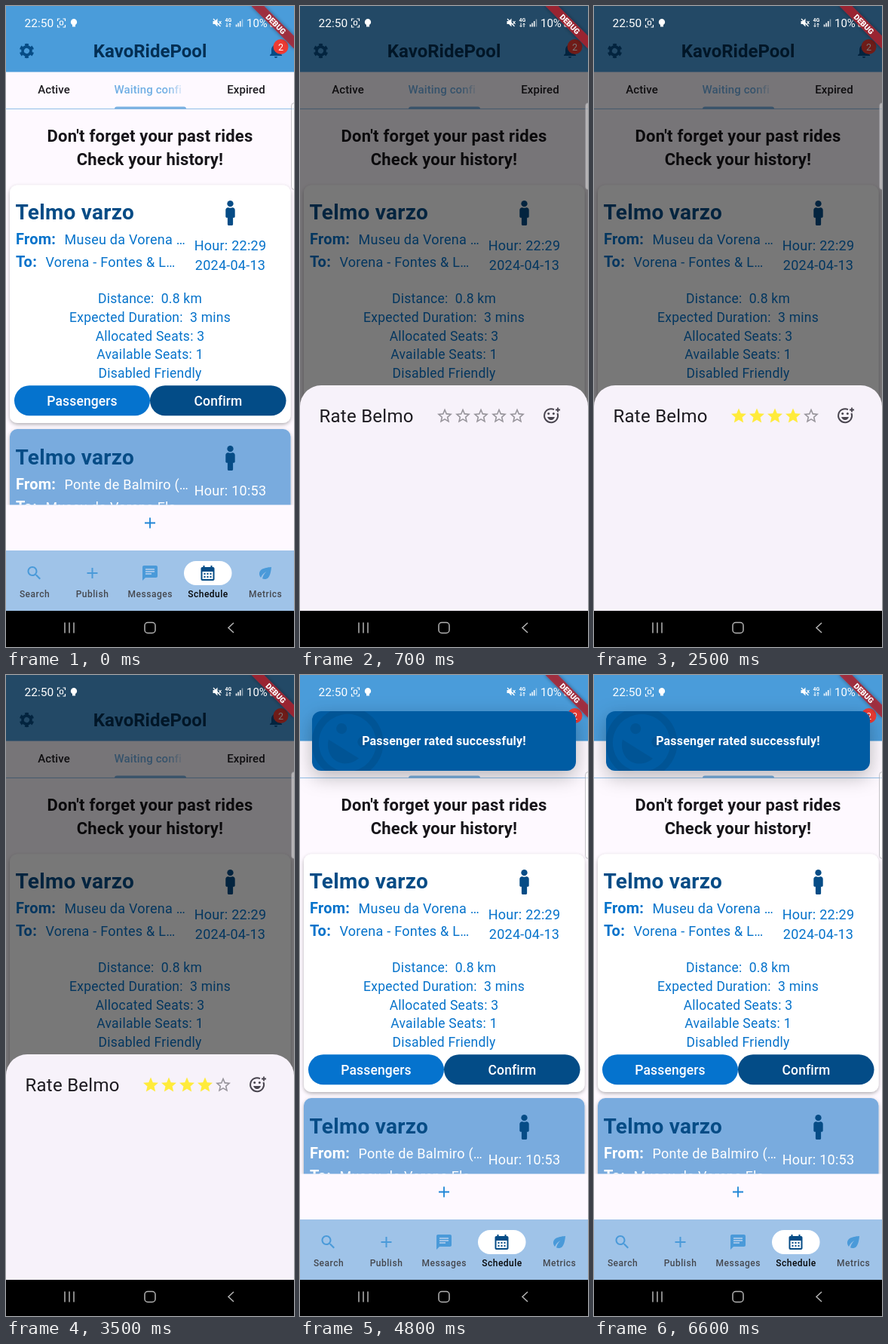
These frames come from a looping animation (382 px wide and 850 px high, 6.7 s). An HTML page:

```html
<!DOCTYPE html>
<html lang="en">
<head>
<meta charset="utf-8">
<title>Ride rating</title>
<style>
  html, body { margin: 0; width: 100%; height: 100%; overflow: hidden; background: #000; }
  svg { display: block; width: 382px; height: 850px; }
  text { font-family: Roboto, "Noto Sans", sans-serif; white-space: pre; }
  .mid { text-anchor: middle; }
  .bold { font-weight: 700; }
  .tab { font-size: 15px; font-weight: 500; letter-spacing: .1px; }
  .headline { font-size: 22px; font-weight: 700; letter-spacing: .2px; fill: #17151a; }
  .driver { font-size: 28px; font-weight: 700; letter-spacing: .25px; fill: #064c86; }
  .label { font-size: 20px; font-weight: 700; letter-spacing: .25px; }
  .value { font-size: 18px; letter-spacing: .25px; }
  .detail { font-size: 17.5px; letter-spacing: .25px; text-anchor: middle; }
  .button { font-size: 17.5px; font-weight: 500; letter-spacing: .1px; fill: #fff; text-anchor: middle; }
  .nav { font-size: 12px; font-weight: 500; letter-spacing: .5px; fill: #45484f; text-anchor: middle; }
</style>
</head>
<body>
<svg viewBox="0 0 382 850">
  <defs>
    <linearGradient id="tabFade" gradientUnits="userSpaceOnUse" x1="212" x2="239" y1="0" y2="0">
      <stop stop-color="#71afe4"/><stop offset="1" stop-color="#71afe4" stop-opacity="0"/>
    </linearGradient>
    <filter id="cardShadow" x="-10%" y="-10%" width="120%" height="120%">
      <feDropShadow dx="0" dy="2" stdDeviation="2.5" flood-opacity=".3"/>
    </filter>
    <filter id="toastShadow" x="-20%" y="-60%" width="140%" height="240%">
      <feDropShadow dx="0" dy="8" stdDeviation="13" flood-opacity=".28"/>
    </filter>
    <filter id="ribbonShadow" x="-20%" y="-80%" width="140%" height="260%">
      <feDropShadow dx="0" dy="0" stdDeviation="2.5" flood-opacity=".5"/>
    </filter>
    <clipPath id="listClip"><rect y="137" width="382" height="524.5"/></clipPath>
    <clipPath id="screenClip"><rect width="382" height="802"/></clipPath>
    <clipPath id="toastClip"><rect x="16" y="48" width="350" height="79" rx="12"/></clipPath>
    <g id="person">
      <circle cx="96" cy="64" r="64"/>
      <path d="M144 144h-11.4c-22.7 10.4-49.6 10.9-73.2 0H48c-26.5 0-48 21.5-48 48v136c0 13.3 10.7 24 24 24h16v136c0 13.3 10.7 24 24 24h64c13.3 0 24-10.7 24-24V352h16c13.3 0 24-10.7 24-24V192c0-26.5-21.5-48-48-48z"/>
    </g>
    <path id="starEmpty" d="M22 9.24l-7.19-.62L12 2 9.19 8.63 2 9.24l5.46 4.73L5.82 21 12 17.27 18.18 21l-1.63-7.03L22 9.24zM12 15.4l-3.76 2.27 1-4.28-3.32-2.88 4.38-.38L12 6.1l1.71 4.04 4.38.38-3.32 2.88 1 4.28L12 15.4z"/>
    <path id="starFull" d="M12 17.27L18.18 21l-1.64-7.03L22 9.24l-7.19-.61L12 2 9.19 8.63 2 9.24l5.46 4.73L5.82 21z"/>
  </defs>

  <g clip-path="url(#screenClip)">
    <rect width="382" height="802" fill="#fef9ff"/>

    <!-- app bar -->
    <rect width="382" height="87.5" fill="#4a9cda"/>
    <g fill="none" stroke="#064c86" transform="translate(27.5 59.5) rotate(30)">
      <circle r="5.5" stroke-width="3.8"/>
      <circle r="8.2" stroke-width="3" pathLength="60" stroke-dasharray="5.4 4.6" stroke-dashoffset="2.7"/>
    </g>
    <text class="mid bold" x="191" y="68" font-size="24" fill="#032f54">KavoRidePool</text>
    <path transform="translate(346 47)" fill="#064c86" d="M12 22c1.1 0 2-.9 2-2h-4c0 1.1.89 2 2 2zm6-6v-5c0-3.07-1.64-5.64-4.5-6.32V4c0-.83-.67-1.5-1.5-1.5s-1.5.67-1.5 1.5v.68C7.63 5.36 6 7.92 6 11v5l-2 2v1h16v-1l-2-2z"/>
    <circle cx="364.5" cy="54" r="10" fill="#ec3b34"/>
    <text class="mid" x="364.5" y="58.5" font-size="12.5" fill="#fff">2</text>

    <!-- tabs -->
    <g class="tab" fill="#1d1b20">
      <text class="mid" x="63.5" y="116">Active</text>
      <text x="143.5" y="116" fill="url(#tabFade)">Waiting confi</text>
      <text class="mid" x="318.5" y="116">Expired</text>
    </g>
    <path d="M0 136.4H382" stroke="#8dbce6"/>
    <path d="M144 136.5a3 3 0 0 1 3-3h89a3 3 0 0 1 3 3z" fill="#79b0e2"/>

    <text class="headline mid" x="191" y="180">Don't forget your past rides</text>
    <text class="headline mid" x="191" y="211">Check your history!</text>

    <!-- ride list -->
    <g clip-path="url(#listClip)">
      <rect x="5" y="237.5" width="372.5" height="315.5" rx="10" fill="#fff" filter="url(#cardShadow)"/>
      <rect x="5" y="561" width="372.5" height="200" rx="10" fill="#79abde" filter="url(#cardShadow)"/>
      <g id="rides"></g>
      <g fill="#0673cb" id="details"></g>
      <rect x="11" y="503.3" width="180" height="40" rx="20" fill="#0573ce"/>
      <rect x="191" y="503.3" width="180.5" height="40" rx="20" fill="#034c87"/>
      <text class="button" x="101" y="529.5">Passengers</text>
      <text class="button" x="281.5" y="529.5">Confirm</text>
    </g>
    <path d="M184 685.5h14m-7-7v14" stroke="#1f86d6" stroke-width="1.8"/>

    <!-- bottom navigation -->
    <rect y="722" width="382" height="80" fill="#9fc3e8"/>
    <rect x="236" y="736" width="63.5" height="32" rx="16" fill="#fff"/>
    <g fill="#4a9ad9">
      <path transform="translate(25.5 740)" d="M15.5 14h-.79l-.28-.27C15.41 12.59 16 11.11 16 9.5 16 5.91 13.09 3 9.5 3S3 5.91 3 9.5 5.91 16 9.5 16c1.61 0 3.09-.59 4.23-1.57l.27.28v.79l5 4.99L20.49 19l-4.99-5zm-6 0C7.01 14 5 11.99 5 9.5S7.01 5 9.5 5 14 7.01 14 9.5 11.99 14 9.5 14z"/>
      <path transform="translate(102.5 740)" d="M19 13h-6v6h-2v-6H5v-2h6V5h2v6h6v2z"/>
      <path transform="translate(179 740)" d="M20 2H4c-1.1 0-1.99.9-1.99 2L2 22l4-4h14c1.1 0 2-.9 2-2V4c0-1.1-.9-2-2-2zM6 9h12v2H6V9zm8 5H6v-2h8v2zm4-6H6V6h12v2z"/>
      <path transform="translate(255.5 740)" fill="#064c86" d="M19 4h-1V2h-2v2H8V2H6v2H5c-1.11 0-1.99.9-1.99 2L3 20c0 1.1.89 2 2 2h14c1.1 0 2-.9 2-2V6c0-1.1-.9-2-2-2zm0 16H5V10h14v10zM9 14H7v-2h2v2zm4 0h-2v-2h2v2zm4 0h-2v-2h2v2zm-8 4H7v-2h2v2zm4 0h-2v-2h2v2zm4 0h-2v-2h2v2z"/>
      <path transform="translate(332 740)" d="M6.05 8.05c-2.73 2.73-2.73 7.15-.02 9.88 1.47-3.4 4.09-6.24 7.36-7.93-2.77 2.34-4.71 5.61-5.39 9.32 2.6 1.23 5.8.78 7.95-1.37C19.43 14.47 20 4 20 4S9.53 4.57 6.05 8.05z"/>
    </g>
    <g class="nav">
      <text x="38" y="784">Search</text>
      <text x="114.5" y="784">Publish</text>
      <text x="191.2" y="784">Messages</text>
      <text x="268" y="784" fill="#050608">Schedule</text>
      <text x="344.2" y="784">Metrics</text>
    </g>

    <rect id="scrim" width="382" height="802"/>

    <!-- rating sheet, laid out from its own top edge -->
    <g id="sheet">
      <path d="M0 300V28A28 28 0 0 1 28 0H354A28 28 0 0 1 382 28V300z" fill="#f7f2fa"/>
      <text x="25.5" y="49" font-size="24" letter-spacing=".25" fill="#1d1b20">Rate Belmo</text>
      <g id="stars"></g>
      <g transform="translate(321 28)" fill="none" stroke="#49454f" stroke-width="2">
        <path d="M16 4.1A9 9 0 1 0 20.5 9"/>
        <path d="M18 4.5h6M21 1.5v6" stroke-width="1.8"/>
        <g fill="#49454f" stroke="none">
          <circle cx="8.7" cy="9.6" r="1.5"/><circle cx="15.3" cy="9.6" r="1.5"/>
          <path d="M7 14h10c-.78 2.34-2.72 4-5 4s-4.22-1.66-5-4z"/>
        </g>
      </g>
    </g>

    <g id="toast">
      <rect x="16" y="48" width="350" height="79" rx="12" fill="#005ca3" filter="url(#toastShadow)"/>
      <g clip-path="url(#toastClip)">
        <g transform="translate(63 90) rotate(32) scale(4.75) translate(-12 -12)" fill-opacity=".085" stroke-opacity=".085">
          <circle cx="12" cy="12" r="9" fill="none" stroke="#000" stroke-width="2"/>
          <circle cx="8.5" cy="9.5" r="1.5"/><circle cx="15.5" cy="9.5" r="1.5"/>
          <path d="M12 18c2.28 0 4.22-1.66 5-4H7c.78 2.34 2.72 4 5 4z"/>
        </g>
      </g>
      <text class="mid" x="191" y="93" font-size="16" font-weight="600" letter-spacing=".2" fill="#fff">Passenger rated successfuly!</text>
    </g>

    <!-- status bar -->
    <g fill="#fff">
      <text x="24.5" y="27.5" font-size="15.5">22:50</text>
      <g fill="none" stroke="#fff" stroke-width="1.2">
        <path d="M68.5 20v-3h3m4 0h3v3m0 5v3h-3m-4 0h-3v-3"/>
        <rect x="71.5" y="20" width="4" height="5" rx="1"/>
      </g>
      <path d="M90 17a4.3 4.3 0 0 1 2 8v2.5h-4V25a4.3 4.3 0 0 1 2-8z"/>
      <path d="M274.5 20h2.5l3.5-3.5v11L277 24h-2.5z"/>
      <path d="M275 17l9.5 10M282.5 20l3 4m0-4l-3 4" stroke="#fff" stroke-width="1.2"/>
      <text class="mid bold" x="295" y="21" font-size="7">4G</text>
      <path d="M293 22.5v5m-1.5-1.5l1.5 1.5 1.5-1.5M297 28v-5m-1.5 1.5l1.5-1.5 1.5 1.5" fill="none" stroke="#fff"/>
      <path d="M305.5 27.5v-3m2.6 3v-5m2.6 5v-7.5" stroke="#fff" stroke-width="1.5"/>
      <path d="M313.5 27.5v-10" stroke="#fff" stroke-width="1.5" opacity=".45"/>
      <text x="319" y="27.5" font-size="15">10%</text>
      <rect x="350" y="17" width="8" height="11" rx="2" opacity=".8"/>
    </g>

    <!-- corner ribbon and edge handle -->
    <g transform="translate(382 0) rotate(45)">
      <rect x="-40" y="28" width="80" height="12" fill="#b2202a" fill-opacity=".8" filter="url(#ribbonShadow)"/>
      <text class="mid" x="0" y="37.7" font-size="10.2" font-weight="900" fill="#fff">DEBUG</text>
    </g>
    <rect x="378.5" y="128.5" width="12" height="115" rx="4" fill="#fff" fill-opacity=".45" stroke="#8a8a90" stroke-opacity=".5"/>
  </g>

  <!-- system navigation -->
  <rect y="802" width="382" height="48"/>
  <g fill="none" stroke="#b4b4b4" stroke-width="1.5">
    <path d="M78 817.5v14m6-14v14m6-14v14M302 818l-7 6.5 7 6.5"/>
    <rect x="184" y="817.5" width="14" height="14" rx="4"/>
  </g>
</svg>

<script>
const LOOP = 6700;
const SHEET_HEIGHT = 299;
const SHEET_OPEN = 324, SHEET_CLOSE = 4350, RATED = 2500;
const TOAST_IN = 4252, TOAST_TIME = 1100, TOAST_TRAVEL = 128;
const byId = id => document.getElementById(id);
const clamp = v => Math.min(1, Math.max(0, v));

function ride(dy, color, from, to, hour, date) {
  const line = (y, label, x, value) =>
    `<text class="label" x="13" y="${y}">${label}</text><text class="value" x="${x}" y="${y}">${value}</text>`;
  return `<g transform="translate(0 ${dy})" fill="${color}">
    <text class="driver" x="12.5" y="282.5">Telmo varzo</text>
    <use href="#person" transform="translate(291.3 258) scale(.0645)" fill="#064c86"/>
    ${line(315.5, "From:", 77.5, from)}${line(345.5, "To:", 52.5, to)}
    <text class="value mid" x="297.5" y="323.5">${hour}</text>
    <text class="value mid" x="297.5" y="349.5">${date}</text></g>`;
}

byId("rides").innerHTML =
  ride(0, "#0673cb", "Museu da Vorena …", "Vorena - Fontes &amp; L…", "Hour: 22:29", "2024-04-13") +
  ride(325, "#fff", "Ponte de Balmiro (…", "Museu da Vorena Fla…", "Hour: 10:53", "");

byId("details").innerHTML =
  ["Distance:  0.8 km", "Expected Duration:  3 mins", "Allocated Seats: 3", "Available Seats: 1", "Disabled Friendly"]
    .map((s, i) => `<text class="detail" x="191" y="${394 + i * 24.8}">${s}</text>`).join("");

byId("stars").innerHTML = [0, 1, 2, 3, 4]
  .map(i => `<use transform="translate(${180 + i * 24} 28.5)"/>`).join("");
const stars = [...byId("stars").children];

function bezier(x1, y1, x2, y2) {
  const at = (a, b, s) => 3 * (1 - s) * (1 - s) * s * a + 3 * (1 - s) * s * s * b + s * s * s;
  return x => {
    let lo = 0, hi = 1;
    for (let i = 0; i < 24; i++) {
      const s = (lo + hi) / 2;
      if (at(x1, x2, s) < x) lo = s; else hi = s;
    }
    return at(y1, y2, hi);
  };
}
const decelerate = bezier(0, 0, 0.2, 1);
const ease = bezier(0.25, 0.1, 0.25, 1);
const elasticOut = t => t >= 1 ? 1 : 1 + 2 ** (-10 * t) * Math.sin((t - 0.1) * 5 * Math.PI);

function render(t) {
  const open = t < SHEET_CLOSE ? clamp((t - SHEET_OPEN) / 250) : clamp(1 - (t - SHEET_CLOSE) / 200);
  byId("scrim").setAttribute("opacity", open ? 0.53 * ease(open) : 0);
  byId("sheet").setAttribute("transform", `translate(0 ${802 - (open ? SHEET_HEIGHT * decelerate(open) : 0)})`);
  byId("sheet").setAttribute("visibility", open ? "visible" : "hidden");

  const rating = t >= RATED ? 4 : 0;
  stars.forEach((star, i) => {
    star.setAttribute("href", i < rating ? "#starFull" : "#starEmpty");
    star.setAttribute("fill", i < rating ? "#ffeb3b" : "#98959c");
  });

  const slide = elasticOut(clamp((t - TOAST_IN) / TOAST_TIME));
  byId("toast").setAttribute("transform", `translate(0 ${TOAST_TRAVEL * (slide - 1)})`);
  byId("toast").setAttribute("visibility", t >= TOAST_IN ? "visible" : "hidden");
}

const start = performance.now();
function tick() {
  render((performance.now() - start) % LOOP);
  requestAnimationFrame(tick);
}
tick();
</script>
</body>
</html>
```
